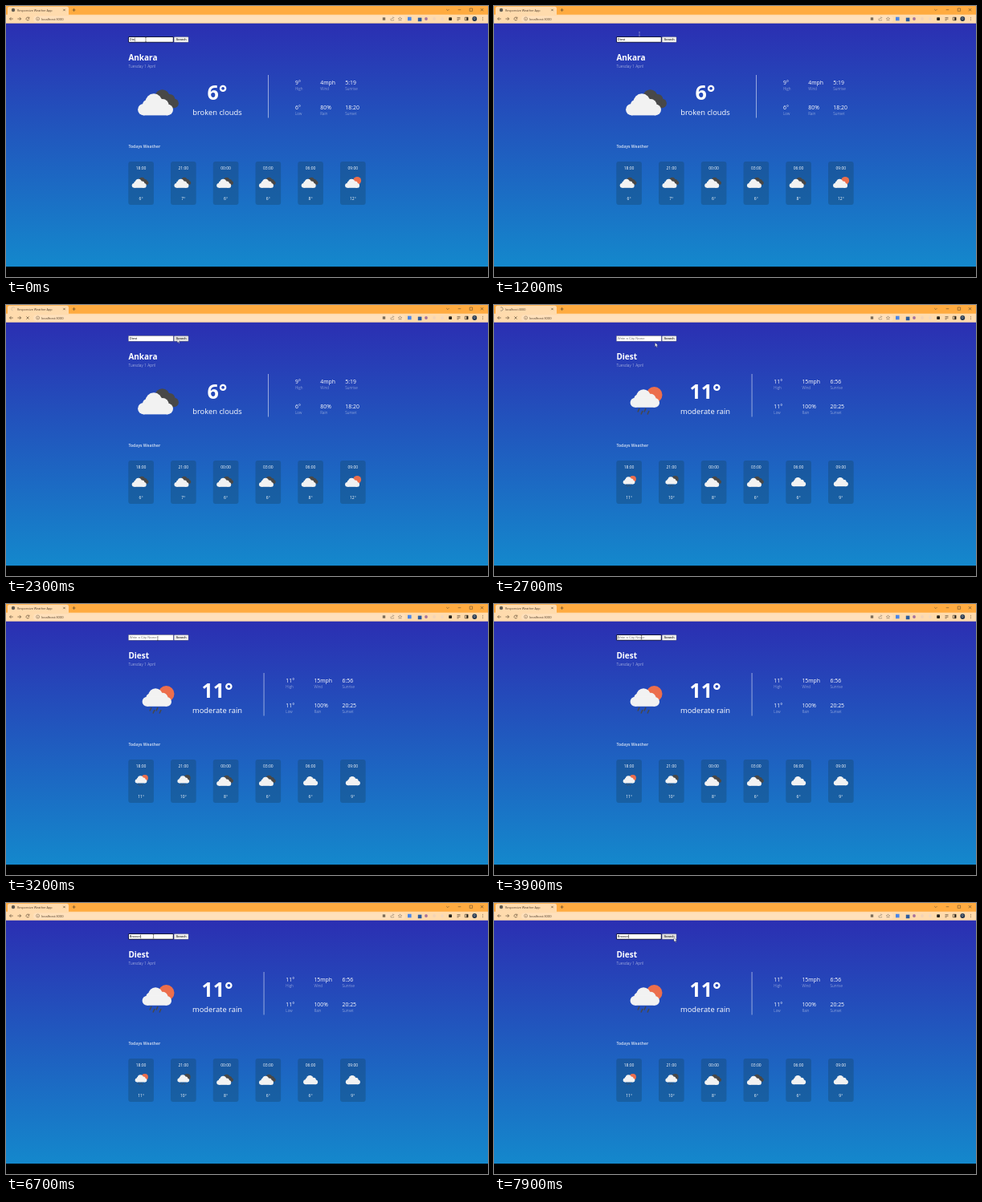
Write an HTML page with a canvas that moves like this. It is 600 px wide and 338 px high and loops after 8000 ms.

```html
<!DOCTYPE html>
<html lang="en">
<head>
<meta charset="utf-8">
<title>Weather</title>
<style>
  html, body { margin: 0; width: 100%; height: 100%; overflow: hidden; background: #000; }
  canvas { display: block; width: 600px; height: 338px; }
</style>
</head>
<body>
<canvas></canvas>
<script>
const W = 600, H = 338, LOOP = 8000;
const canvas = document.querySelector('canvas');
const ctx = canvas.getContext('2d');
const ratio = window.devicePixelRatio || 1;
canvas.width = W * ratio;
canvas.height = H * ratio;

const SANS = '"Open Sans", sans-serif';
const FORM = '"Liberation Sans", Arial, sans-serif';
const DARK = '#484848', SUN = '#ec6e4c', INK = '#4a3a28';

const HOURS = ['18:00', '21:00', '00:00', '03:00', '06:00', '09:00'];
const ANKARA = {
  city: 'Ankara', temp: '6°', sky: 'broken clouds', icon: 'broken', iconAt: [189.5, 120.5],
  divider: 326.6, columns: [360, 391.3, 422.3],
  values: ['9°', '4mph', '5:19', '6°', '80%', '18:20'],
  hourly: ['6°', '7°', '6°', '6°', '8°', '12°'],
  icons: ['broken', 'broken', 'broken', 'broken', 'broken', 'few']
};
const DIEST = {
  city: 'Diest', temp: '11°', sky: 'moderate rain', icon: 'rainDay', iconAt: [188, 120],
  divider: 321, columns: [348.3, 383.4, 418.5],
  values: ['11°', '15mph', '6:56', '11°', '100%', '20:25'],
  hourly: ['11°', '10°', '8°', '6°', '6°', '9°'],
  icons: ['rainDay', 'rainNight', 'broken', 'broken', 'cloud', 'cloud']
};
const LABELS = ['High', 'Wind', 'Sunrise', 'Low', 'Rain', 'Sunset'];

// Moments in ms
const SUBMIT = 2000, ARRIVE = 2500, LOADED = 3000, FOCUS = 3900;
const EDITS = [
  [0, 'Die'], [200, 'Dies'], [400, 'Diest'], [ARRIVE, ''], [FOCUS, ''],
  [5400, 'B'], [5600, 'Br'], [5800, 'Bru'], [6100, 'Brus'], [6300, 'Bruss'],
  [6500, 'Brusse'], [6700, 'Brussel']
];
const MOUSE = [
  [0, 174, 42], [900, 174, 42], [1200, 181, 35], [1900, 213.2, 42], [2400, 213.2, 42],
  [2700, 200.5, 47], [3500, 183.5, 41.5], [7100, 183.5, 41.5], [7850, 224, 43.3], [LOOP, 224, 43.3]
];

function text(str, x, y, size, { weight = 400, color = '#fff', align = 'left', font = SANS } = {}) {
  ctx.font = `${weight} ${size}px ${font}`;
  ctx.fillStyle = color;
  ctx.textAlign = align;
  ctx.fillText(str, x, y);
}

function box(x, y, w, h, color, radius = 0) {
  ctx.fillStyle = color;
  ctx.beginPath();
  ctx.roundRect(x, y, w, h, radius);
  ctx.fill();
}

function dot(x, y, r, color) {
  ctx.fillStyle = color;
  ctx.beginPath();
  ctx.arc(x, y, r, 0, 7);
  ctx.fill();
}

function stroke(d, color, width = 0.6) {
  ctx.strokeStyle = color;
  ctx.lineWidth = width;
  ctx.stroke(new Path2D(d));
}

function cross(x, y, r, color) {
  stroke(`M${x - r} ${y - r}L${x + r} ${y + r}M${x - r} ${y + r}L${x + r} ${y - r}`, color);
}

function cloud(x, y, scale, color) {
  ctx.save();
  ctx.translate(x, y);
  ctx.scale(scale, scale);
  dot(7.3, 20.2, 7.2, color);
  dot(12, 14, 6, color);
  dot(20, 10.8, 10.5, color);
  dot(31, 14.5, 7.5, color);
  dot(37, 20.4, 7, color);
  box(7.3, 13, 29.7, 14.4, color);
  ctx.restore();
}

function rain(back) {
  dot(11.5, -8, 10, back);
  cloud(-18.5, -15, 0.83, '#f2f2f2');
  for (let i = 0; i < 4; i++) {
    const x = -7 + i * 4, y = 9 + (i % 2) * 3;
    stroke(`M${x} ${y}l-2 4.5`, DARK, 1.5);
  }
}

const ICONS = {
  broken() { cloud(-12, -16.5, 0.85, DARK); cloud(-25.5, -11.5, 1, '#f2f2f2'); },
  few() { dot(13, -6, 12, SUN); cloud(-24, -11.5, 1, '#f2f2f2'); },
  cloud() { cloud(-22, -13, 1, '#f2f2f2'); },
  rainDay() { rain(SUN); },
  rainNight() { rain(DARK); }
};

function icon(name, x, y, scale) {
  ctx.save();
  ctx.translate(x, y);
  ctx.scale(scale, scale);
  ICONS[name]();
  ctx.restore();
}

function drawBrowser(t) {
  const loading = t >= SUBMIT && t < LOADED;
  box(0, 0, W, 11, '#ffab40');
  box(2, 0.8, 76, 12, '#ffdbad', 2.5);
  box(0, 10.8, W, 11, '#ffdbad');
  box(34, 12.2, 463, 8, '#ffe0bb', 4);

  if (loading) {
    const turn = t / 160;
    ctx.strokeStyle = t < ARRIVE ? '#c9b89c' : '#6b6255';
    ctx.lineWidth = 0.6;
    ctx.beginPath();
    ctx.arc(9, 5, 2.2, turn, turn + 4);
    ctx.stroke();
    cross(27, 16, 1.6, INK);
  } else {
    dot(9, 5, 2.2, '#5f5a50');
    stroke('M28.6 15A1.9 1.9 0 1 0 28.8 16.6M28.9 13.7V15.3H27.3', INK);
  }
  const waiting = t >= ARRIVE && t < LOADED;
  text(waiting ? 'localhost:3000' : 'Responsive Weather App', 14, 6.6, 3.75, { color: INK });
  cross(72.5, 5, 1.2, INK);
  stroke('M82.6 5H86.6M84.6 3V7', INK);

  stroke('M8.8 16H4.6M6.4 14.1L4.5 16L6.4 17.9', INK);
  stroke('M14.4 16H18.6M16.8 14.1L18.7 16L16.8 17.9', INK);
  stroke('M37.6 16a2 2 0 1 0 4 0a2 2 0 1 0 -4 0M39.6 15.7V17', '#6d5d48', 0.5);
  text('localhost:3000', 44, 17.6, 4.1, { color: INK });

  stroke('M548.2 4l1.7 1.7l1.7-1.7M562.7 4.7h3.6M577.2 3h3.4v3.4h-3.4z', INK, 0.5);
  cross(592.5, 4.7, 1.6, INK);

  box(468.8, 14.3, 3.4, 3.4, '#7d6d58');
  stroke('M479 15.5v2.4h3.6v-1M480 16.2q.4-1.6 2.6-1.6M481.6 13.4l1.2 1.2l-1.2 1.2', '#7d6d58', 0.5);
  stroke('M490.5 13.8l.7 1.5l1.6.2l-1.2 1.1l.3 1.6l-1.4-.8l-1.4.8l.3-1.6l-1.2-1.1l1.6-.2z', '#7d6d58', 0.5);
  box(500, 13.7, 4.6, 4.6, '#4a86e8');
  box(512.8, 14.6, 4.6, 4.6, '#2c5b9d');
  dot(523, 16, 1.9, '#a8729a');
  dot(533, 16, 1.9, '#f3d3b6');
  dot(543, 16, 1.9, '#f3d7bd');
  box(551.2, 14.3, 3.8, 3.6, '#252019', 0.7);
  stroke('M561.5 14.6h4M561.5 16.2h4M561.5 17.8h2', INK);
  stroke('M571.3 14.2h3.8v3.6h-3.8z', '#252019');
  box(573.2, 14.2, 1.9, 3.6, '#252019');
  dot(583.3, 16, 2.9, '#24364d');
  text('D', 583.3, 17.1, 3, { align: 'center' });
  for (const y of [14.3, 16, 17.7]) dot(593.5, y, 0.45, INK);
}

function drawWeather(w) {
  const sky = ctx.createLinearGradient(0, 22, 0, 325);
  sky.addColorStop(0, '#2b2fb2');
  sky.addColorStop(1, '#1488cc');
  box(0, 21.8, W, 303.4, sky);
  box(0, 325.2, W, 13, '#000');

  const soft = 'rgba(255,255,255,.7)';
  text(w.city, 152.4, 68, 10, { weight: 700 });
  text('Tuesday 1 April', 152.4, 76.5, 5, { weight: 300, color: 'rgba(255,255,255,.8)' });
  icon(w.icon, ...w.iconAt, 1);
  text(w.temp, 263, 116.5, 25, { weight: 700, align: 'center' });
  text(w.sky, 263, 136, 9.375, { align: 'center' });
  box(w.divider - 0.3, 86, 0.7, 53.5, 'rgba(255,255,255,.75)');

  w.values.forEach((value, i) => {
    const x = w.columns[i % 3], y = i < 3 ? 97.6 : 129;
    text(value, x, y, 6.875);
    text(LABELS[i], x, y + 7, 4.6, { weight: 300, color: soft });
  });

  text('Todays Weather', 152.4, 176.6, 5, { weight: 700, color: soft });
  HOURS.forEach((hour, i) => {
    const x = 168.1 + i * 52.75;
    box(x - 15.8, 194, 31.6, 54, 'rgba(20,70,110,.4)', 3);
    text(hour, x, 204, 5, { align: 'center' });
    icon(w.icons[i], x - (w.icons[i] === 'broken' ? 1 : 0), 220.3, 0.41);
    text(w.hourly[i], x, 241.6, 5, { align: 'center' });
  });
}

function drawSearch(t, mouse) {
  const [editedAt, value] = EDITS.findLast(([at]) => at <= t);
  const focused = t < SUBMIT || t >= FOCUS;
  const edge = focused ? 0.7 : 0.4;
  box(152.3, 38.3, 56.2, 7.2, focused ? '#101018' : '#70707a', focused ? 0.8 : 0);
  box(152.3 + edge, 38.3 + edge, 56.2 - 2 * edge, 7.2 - 2 * edge, '#fff');
  text(value || 'Write a City Name', 153.8, 43.3, 4.17, { font: FORM, color: value ? '#111' : '#757575' });
  if (focused && Math.floor((t - editedAt) / 500) % 2 === 0) {
    const end = 153.8 + (value ? ctx.measureText(value).width : 0);
    box(end, 39.6, 0.4, 4.6, '#000');
  }

  const hover = mouse.x > 209 && mouse.x < 227.3 && mouse.y < 45.5;
  box(209, 38.4, 18.3, 7, '#70707a', 0.8);
  box(209.4, 38.8, 17.5, 6.2, hover ? '#e2e2e2' : '#efefef', 0.6);
  text('Search', 218.1, 43.3, 4.17, { font: FORM, color: '#000', align: 'center' });
}

function mouseAt(t) {
  const i = MOUSE.findIndex(([at]) => at > t);
  const [t0, x0, y0] = MOUSE[i - 1], [t1, x1, y1] = MOUSE[i];
  const p = (t - t0) / (t1 - t0), k = p * p * (3 - 2 * p);
  return { x: x0 + (x1 - x0) * k, y: y0 + (y1 - y0) * k };
}

function drawMouse({ x, y }) {
  if (x < 208.5 && y < 45.5) {
    const color = y < 38 ? '#a9a9d0' : '#333';
    stroke(`M${x - 0.9} ${y - 2.4}h1.8M${x} ${y - 2.4}v4.8M${x - 0.9} ${y + 2.4}h1.8`, color, 0.5);
    return;
  }
  const arrow = `M${x} ${y}v5l1.2-1.1l.9 1.9l.8-.4l-.9-1.8h1.6z`;
  ctx.fillStyle = '#fff';
  ctx.fill(new Path2D(arrow));
  stroke(arrow, '#222', 0.3);
}

function draw(now) {
  const t = now % LOOP;
  const mouse = mouseAt(t);
  ctx.setTransform(ratio, 0, 0, ratio, 0, 0);
  drawBrowser(t);
  drawWeather(t < ARRIVE ? ANKARA : DIEST);
  drawSearch(t, mouse);
  drawMouse(mouse);
  requestAnimationFrame(() => draw(performance.now() - start));
}

const start = performance.now();
draw(0);
</script>
</body>
</html>
```
